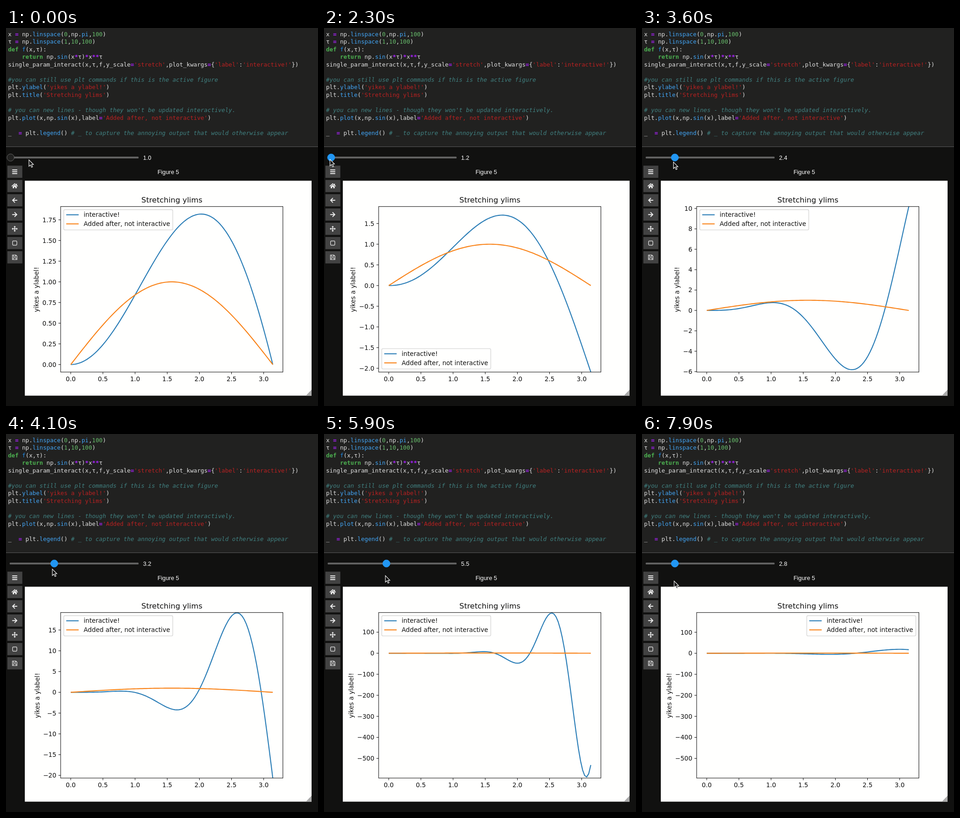
Recreate the animation shown at these times as an HTML page. Size 680 px wide and 823 px high, loop 8000 ms.

```html
<!DOCTYPE html>
<html lang="en">
<head>
<meta charset="utf-8">
<title>Interactive plot</title>
<style>
  html, body { margin: 0; width: 100%; height: 100%; overflow: hidden; background: #111110; }
  pre, svg { position: absolute; left: 0; top: 0; }
  pre {
    box-sizing: border-box; margin: 0; width: 680px; height: 259px; padding: 5.6px 0 0 4.4px;
    background: #212120; border-bottom: 1px solid #5c5c5c; color: #e0e0e0;
    font: 12.68px/16.54px "DejaVu Sans Mono", monospace;
  }
  pre b { color: #a2f; }
  pre b.kw { color: #4caf50; }
  pre i { color: #408080; }
  .num { color: #66bb6a; }
  .str { color: #ba2121; }
  .prop { color: #42a5f5; }
  .def { color: #1e88e5; }
  .ui { font: 12.85px "Liberation Sans", Arial, sans-serif; fill: #fff; }
  .plot { font: 13.64px "DejaVu Sans", sans-serif; fill: #111; }
  .icon { fill: none; stroke: #eee; stroke-width: 2; }
  .line { fill: none; stroke-width: 2.15; stroke-linejoin: round; }
</style>
</head>
<body>
<pre>x <b>=</b> np.<span class="prop">linspace</span>(<span class="num">0</span>,np.<span class="prop">pi</span>,<span class="num">100</span>)
τ <b>=</b> np.<span class="prop">linspace</span>(<span class="num">1</span>,<span class="num">10</span>,<span class="num">100</span>)
<b class="kw">def</b> <span class="def">f</span>(x,τ):
    <b class="kw">return</b> np.<span class="prop">sin</span>(x<b>*</b>τ)<b>*</b>x<b>**</b>τ
single_param_interact(x,τ,f,y_scale<b>=</b><span class="str">'stretch'</span>,plot_kwargs<b>=</b>{<span class="str">'label'</span>:<span class="str">'interactive!'</span>})

<i>#you can still use plt commands if this is the active figure</i>
plt.<span class="prop">ylabel</span>(<span class="str">'yikes a ylabel!'</span>)
plt.<span class="prop">title</span>(<span class="str">'Stretching ylims'</span>)

<i># you can new lines - though they won't be updated interactively.</i>
plt.<span class="prop">plot</span>(x,np.<span class="prop">sin</span>(x),label<b>=</b><span class="str">'Added after, not interactive'</span>)

_  <b>=</b> plt.<span class="prop">legend</span>() <i># _ to capture the annoying output that would otherwise appear</i></pre>

<svg width="680" height="823" viewBox="0 0 680 823">
  <defs><clipPath id="axes"><rect x="119.1" y="388.7" width="484.4" height="360.4"/></clipPath></defs>
  <rect x="8" y="280" width="281" height="4" rx="1.5" fill="#616161"/>
  <circle id="thumb" cy="282" r="7.9"/>
  <text id="value" class="ui" x="298.7" y="287"/>
  <text class="ui" x="353.7" y="318" text-anchor="middle">Figure 5</text>
  <g id="buttons"></g>
  <rect x="41" y="332.5" width="625" height="468" fill="#fffffe"/>
  <path d="M666 787.5V800.5H653.5Z" fill="#aaa"/>
  <g id="plot" class="plot"></g>
  <path id="cursor" d="M0 0V14.2L3.3 11.2 5.7 16.4 8 15.4 5.7 10.3H10Z" fill="#111" stroke="#fff" stroke-width="1.1"/>
</svg>

<script>
const LOOP = 8000, STEP = 100;
const BLUE = '#2a7db6', ORANGE = '#f98319';
const EM = 13.56;
const box = { left: 119.1, right: 603.5, top: 388.7, bottom: 749.1 };
const legendSize = { w: 237.6, h: 44.2 };
const byId = id => document.getElementById(id);
const clamp = (v, low, high) => Math.min(high, Math.max(low, v));

// Key points as [time, value], joined by straight lines.
const cursorX = [
  [400, 50], [700, 33], [800, 33], [1300, 8], [1900, 8], [2300, 13], [2400, 13], [3100, 41], [3700, 74],
  [4100, 101], [4600, 128], [5000, 156], [5400, 156], [6300, 116], [6700, 104], [7500, 61], [7600, 61], [7900, 70]
];
const cursorY = [[400, 287], [700, 281], [2300, 286], [4100, 294], [5000, 303], [7900, 320]];
const labelLag = [[2300, 0], [3100, 300], [4100, 400], [5000, 150], [6700, 350], [7900, 200]];
const pauses = [[2100, 2300], [2300, 2500], [5100, 5500], [7700, 7900]];

function valueAt(points, time) {
  const next = points.findIndex(point => point[0] > time);
  if (next <= 0) return points.at(next)[1];
  const [t0, v0] = points[next - 1], [t1, v1] = points[next];
  return v0 + (v1 - v0) * (time - t0) / (t1 - t0);
}

function settle(time) {
  const pause = pauses.find(([from, to]) => time >= from && time < to);
  return pause ? pause[0] : time;
}

// The thumb snaps to the cursor; label and curve follow it late.
const thumbAt = time => time < 1900 ? 0 : Math.round((valueAt(cursorX, time) - 7.2) / 2.8);
const labelAt = time => thumbAt(time - valueAt(labelLag, time));
const curveAt = time => thumbAt(time - clamp(time - 2300, 0, 400));

const tau = index => 1 + index / 11;
const xs = Array.from({ length: 100 }, (_, i) => i * Math.PI / 99);
const curve = index => xs.map(x => Math.sin(x * tau(index)) * x ** tau(index));
const sine = xs.map(Math.sin);
const toX = x => box.left + (x / Math.PI + 0.05) / 1.1 * (box.right - box.left);

// Limits only ever grow while the slider is dragged.
function limitsAt(time) {
  const peak = Math.max(...curve(0));
  let low = -0.05 * peak, high = 1.05 * peak;
  for (let t = 0; t <= time; t += STEP) {
    const ys = curve(curveAt(settle(t)));
    low = Math.min(low, ...ys);
    high = Math.max(high, ...ys);
  }
  return [low, high];
}

function tickStep(range) {
  const raw = range / 9, unit = 10 ** Math.floor(Math.log10(raw));
  return unit * [1, 2, 2.5, 5, 10].find(m => m * unit >= raw);
}

// First legend corner, in order of preference, that covers the fewest points.
function legendPlace(points) {
  const corners = [[1, 0], [0, 0], [0, 1], [1, 1]];
  const pad = EM / 2;
  let best;
  for (const [h, v] of corners) {
    const x = box.left + pad + h * (box.right - box.left - 2 * pad - legendSize.w);
    const y = box.top + pad + v * (box.bottom - box.top - 2 * pad - legendSize.h);
    const hits = points.filter(([px, py]) =>
      px > x && px < x + legendSize.w && py > y && py < y + legendSize.h).length;
    if (!best || hits < best.hits) best = { x, y, hits };
  }
  return best;
}

const text = (x, y, content, extra = '') => `<text x="${x}" y="${y}" ${extra}>${content}</text>`;
const tick = d => `<path d="${d}" stroke="#111" stroke-width="1.08"/>`;
const polyline = (points, color) =>
  `<polyline class="line" clip-path="url(#axes)" stroke="${color}" points="${points.join(' ')}"/>`;

function legend(points) {
  const { x, y } = legendPlace(points);
  const row = (dy, color, name) =>
    `<path class="line" d="M${x + 5.4} ${y + dy}h27.1" stroke="${color}"/>` + text(x + 43.4, y + dy + 4.7, name);
  return `<rect x="${x}" y="${y}" width="${legendSize.w}" height="${legendSize.h}" rx="2.7"
    fill="#fff" stroke="#ccc" stroke-width="1.36" opacity=".8"/>`
    + row(11.2, BLUE, 'interactive!') + row(31, ORANGE, 'Added after, not interactive');
}

function plot(time) {
  const [low, high] = limitsAt(time);
  const toY = y => box.bottom - (y - low) / (high - low) * (box.bottom - box.top);
  const place = ys => ys.map((y, i) => [toX(xs[i]), toY(y)]);
  const blue = place(curve(curveAt(time))), orange = place(sine);
  let out = polyline(blue, BLUE) + polyline(orange, ORANGE);

  for (let x = 0; x <= 3; x += 0.5) {
    out += tick(`M${toX(x)} ${box.bottom}v4.75`)
      + text(toX(x), 768.7, x.toFixed(1), 'text-anchor="middle"');
  }

  const step = tickStep(high - low);
  const decimals = (String(step).split('.')[1] || '').length;
  let widest = 0;
  for (let i = Math.ceil(low / step); i <= Math.floor(high / step); i++) {
    const y = toY(i * step), label = (i * step).toFixed(decimals).replace('-', '−');
    const ems = [...label].reduce((sum, c) => sum + (c === '−' ? .838 : c === '.' ? .318 : .636), 0);
    widest = Math.max(widest, ems * EM);
    out += tick(`M${box.left} ${y}h-4.75`) + text(109.7, y + 4.9, label, 'text-anchor="end"');
  }

  const labelX = 109.7 - widest - 8.4;
  return out
    + `<rect x="${box.left}" y="${box.top}" width="${box.right - box.left}" height="${box.bottom - box.top}"
        fill="none" stroke="#111" stroke-width="1.08"/>`
    + text(0, 0, 'yikes a ylabel!', `text-anchor="middle" transform="translate(${labelX} 569.5) rotate(-90)"`)
    + text(361.6, 380, 'Stretching ylims', 'text-anchor="middle" style="font-size:16.4px"')
    + legend([...blue, ...orange]);
}

const stroke = (d, width = 2) => `<path class="icon" d="${d}" style="stroke-width:${width}"/>`;
const solid = d => `<path d="${d}" fill="#eee"/>`;
const arrow = stroke('M5.5 0H-4M.5-5L-4.5 0 .5 5');
const arrowHead = solid('M0-6.5L2.6-3.6H-2.6Z');
const icons = [
  stroke('M-5.5-4H5.5M-5.5 0H5.5M-5.5 4H5.5'),
  stroke('M-6.5 .5L0-5 6.5 .5M4-5V-2', 1.7) + solid('M-4.3 .8L0-2.8 4.3 .8V5H1.3V2H-1.3V5H-4.3Z'),
  arrow,
  `<g transform="scale(-1 1)">${arrow}</g>`,
  stroke('M-5 0H5M0-5V5', 1.6)
    + [0, 90, 180, 270].map(a => `<g transform="rotate(${a})">${arrowHead}</g>`).join(''),
  '<rect x="-4.6" y="-4.6" width="9.2" height="9.2" rx="1.6" class="icon" style="stroke-width:1.2"/>',
  stroke('M-5-5H2.5L5-2.5V5H-5ZM-2.8-5V-1.6H2V-5M-3 5V1.2H3V5', 1.1)
];
byId('buttons').innerHTML = icons.map((icon, i) =>
  `<g transform="translate(19 ${313 + i * 31.05})">
    <rect x="-16" y="-13.3" width="32.6" height="26.6" fill="#424242"/>${icon}</g>`).join('');

function draw(time) {
  const active = time >= 1200;
  const thumb = byId('thumb');
  thumb.setAttribute('cx', 10 + 2.8 * thumbAt(time));
  thumb.setAttribute('fill', active ? '#2196f3' : '#212120');
  thumb.setAttribute('stroke', active ? '#2196f3' : '#616161');
  byId('value').textContent = tau(labelAt(time)).toFixed(1);
  byId('cursor').setAttribute('transform', `translate(${valueAt(cursorX, time)} ${valueAt(cursorY, time)})`);
  byId('plot').innerHTML = plot(time);
}

let shown = -1;
function frame() {
  const time = settle(Math.floor(performance.now() % LOOP / STEP) * STEP);
  if (time !== shown) draw(shown = time);
  requestAnimationFrame(frame);
}
frame();
</script>
</body>
</html>
```
